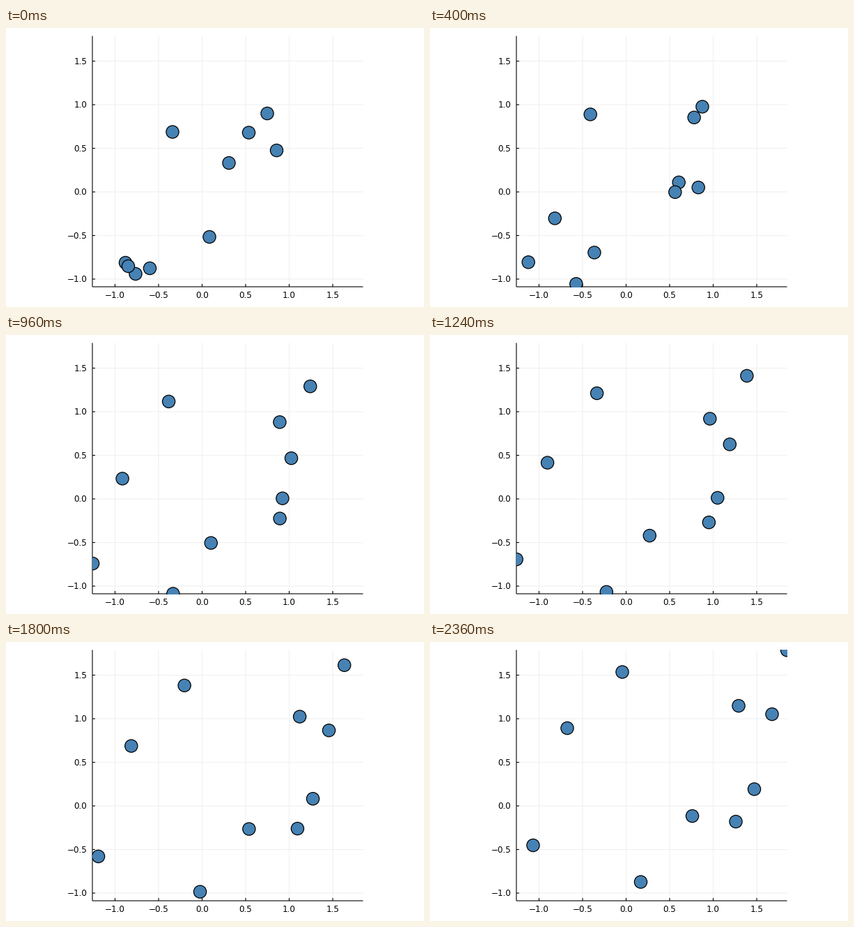
These frames come from a looping animation (600 px wide and 400 px high, 2.46 s). A matplotlib script:

```python
import numpy as np
import matplotlib.pyplot as plt
from matplotlib.animation import FuncAnimation
from matplotlib.patches import Circle, Rectangle

W, H, DPI = 600, 400, 100
PX = 72 / DPI                       # one pixel in points
TICK_MS, LOOP_MS, LAST_STEP = 20, 2460, 50
LEFT, RIGHT, TOP, BOTTOM = 124, 512.5, 11.4, 371
X0, Y0, UNIT = 281.5, 235, 125      # stage position of the data origin, scale

# Where each particle starts and ends, in stage pixels
START = np.array([(239, 149), (348.5, 150), (375, 122.5), (388.5, 175.5), (320, 193.5),
                  (292, 299.5), (206.5, 344.5), (171.5, 336.5), (186, 352.5), (175.5, 341.5)])
END = np.array([(276, 43), (512.5, 11.8), (443, 91.5), (439, 257.5), (465.5, 211),
                (491, 103.5), (197, 123.5), (148, 291.5), (302.5, 344), (376.5, 249.5)])

# The flock drifts evenly while each particle's own motion dies away,
# sooner for those close to the middle of the flock.
DRIFT = (END - START).mean(axis=0) / LAST_STEP
OWN = END - START - DRIFT * LAST_STEP


def spread(points):
    return np.hypot(*(points - points.mean(axis=0)).T)


DECAY = (0.0788 - 0.00006 * (spread(START) + spread(END)))[:, None]


def positions(step):
    eased = np.expm1(-DECAY * step) / np.expm1(-DECAY * LAST_STEP)
    return START + DRIFT * step + OWN * eased


def step_at(ms):
    # Steps last 20, 100 and 20 ms in turn.
    turn, rest = divmod(ms, 140)
    return min(3 * turn + (rest >= 20) + (rest >= 120), LAST_STEP)


plt.rcParams["font.family"] = "DejaVu Sans"
fig = plt.figure(figsize=(W / DPI, H / DPI), dpi=DPI, facecolor="white")
ax = fig.add_axes([0, 0, 1, 1])
ax.set(xlim=(0, W), ylim=(H, 0))
ax.axis("off")


def line(xs, ys, color="black", z=2):
    ax.plot(xs, ys, color=color, linewidth=1.1 * PX, zorder=z,
            solid_capstyle="butt", snap=False)


def label(x, baseline, value, align):
    ax.text(x, baseline, f"{value:.1f}".replace("-", "\u2212"),
            fontsize=12 * PX, ha=align, va="baseline")


for value in np.arange(-1, 1.6, 0.5):
    x, y = X0 + UNIT * value, Y0 - UNIT * value
    line((x, x), (TOP, BOTTOM), "#f0f0f0", 1)
    line((LEFT, RIGHT), (y, y), "#f0f0f0", 1)
    line((x, x), (BOTTOM, BOTTOM - 4))
    line((LEFT, LEFT + 4), (y, y))
    label(x, 387.4, value, "center")
    label(116.2, y + 4.2, value, "right")
line((LEFT, LEFT), (TOP, BOTTOM))
line((LEFT, RIGHT), (BOTTOM, BOTTOM))

plot_area = Rectangle((LEFT, BOTTOM + 0.6), RIGHT - LEFT, TOP - BOTTOM - 0.6,
                      transform=ax.transData)
dots = []
for p in START:
    dot = ax.add_patch(Circle(p, 9.1, facecolor="steelblue", edgecolor="black",
                              linewidth=1.25 * PX, zorder=3))
    dot.set_clip_path(plot_area)
    dots.append(dot)


def draw(frame):
    for dot, p in zip(dots, positions(step_at(frame * TICK_MS))):
        dot.center = p
    return dots


anim = FuncAnimation(fig, draw, frames=LOOP_MS // TICK_MS, interval=TICK_MS,
                     repeat=True, repeat_delay=0, blit=False)
plt.show()
```
